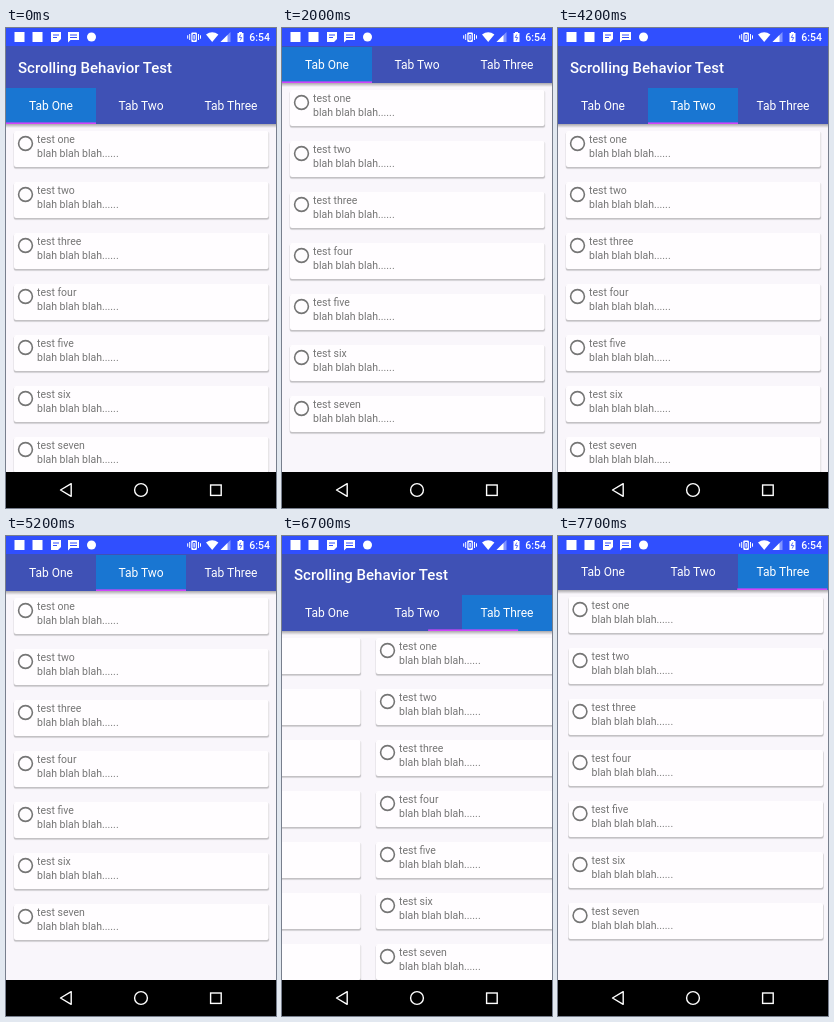
These frames come from a looping animation (270x480 px, 8000 ms). An HTML page:

```html
<!DOCTYPE html>
<html>
<head>
<meta charset="utf-8">
<style>
html, body { margin: 0; width: 100%; height: 100%; overflow: hidden; background: #000; }
svg { display: block; width: 100%; height: 100%; font-family: Roboto, sans-serif; }
#pages text { font-size: 10.5px; fill: #757575; }
#bar text { fill: #fff; font-size: 12px; text-anchor: middle; }
#bar .title { font-size: 15px; font-weight: 500; text-anchor: start; }
</style>
</head>
<body>
<svg viewBox="0 0 270 480">
  <defs>
    <linearGradient id="shade" x2="0" y2="1">
      <stop stop-color="#000" stop-opacity=".32"/>
      <stop offset="1" stop-color="#000" stop-opacity="0"/>
    </linearGradient>
  </defs>
  <rect width="270" height="444" fill="#f9f6fb"/>
  <g id="pages"></g>
  <g id="bar">
    <rect y="96" width="270" height="4" fill="url(#shade)"/>
    <rect y="18" width="270" height="78" fill="#3f51b5"/>
    <text class="title" x="12" y="44.7">Scrolling Behavior Test</text>
    <rect id="active" y="60" width="90" height="36" fill="#1976d2"/>
    <rect id="line" y="94.4" width="90" height="1.6" fill="#d045fa"/>
    <text x="45" y="82.3">Tab One</text>
    <text x="135" y="82.3">Tab Two</text>
    <text x="225" y="82.3">Tab Three</text>
  </g>

  <!-- status bar -->
  <rect width="270" height="18" fill="#304ffe"/>
  <g fill="#fff">
    <rect x="8.5" y="4" width="10" height="10"/>
    <rect x="26.5" y="4" width="10" height="10"/>
    <path d="M45 4h10v7l-3 3h-7z"/>
    <path d="M62 4h11v8h-8.500l-2.500 2.500z"/>
    <circle cx="85.500" cy="9" r="4.500"/>
    <rect x="185.300" y="4.500" width="5.600" height="9.500" rx="1"/>
    <path d="M200 6.500q6.200-4.500 12.400 0L206.200 14z"/>
    <path d="M214.500 14h10V4z" opacity=".4"/>
    <path d="M214.500 14h7V7z"/>
    <path d="M231.500 5h1.500V4h3v1h1.500v9h-6z"/>
    <text x="264" y="12.900" font-size="10.500" font-weight="500" text-anchor="end">6:54</text>
  </g>
  <path d="M47 7h6M47 9.500h4M64 7h7M64 9.500h7M187 6.500h2.200v5.500h-2.200z" stroke="#304ffe" fill="none"/>
  <path d="M183.700 6v6M181.700 7.300v3.400M192.500 6v6M194.500 7.300v3.400" stroke="#fff"/>
  <path d="M234.800 6.500l-1.500 3h2.400l-1.500 3" stroke="#304ffe" stroke-width=".8" fill="none"/>

  <!-- navigation bar -->
  <rect y="444" width="270" height="36" fill="#000"/>
  <g fill="none" stroke="#fff" stroke-width="1.400">
    <path d="M54.500 462l10.700-6.300v12.600z" stroke-linejoin="round"/>
    <circle cx="135" cy="462" r="6.400"/>
    <rect x="204.600" y="457" width="10.600" height="10.400"/>
  </g>
</svg>
<script>
const $ = id => document.getElementById(id);
const names = ["one", "two", "three", "four", "five", "six", "seven"];

const card = (x, y, name) => `<g transform="translate(${x} ${y})">
  <rect x="7.500" y=".4" width="256" height="37.800" rx="2.500" opacity=".06"/>
  <rect x="7.800" y="1" width="255.200" height="36.500" rx="2" opacity=".17"/>
  <rect x="8" width="254.600" height="36" rx="2" fill="#fffdff"/>
  <circle cx="19.500" cy="12.500" r="6.900" fill="none" stroke="#757575" stroke-width="1.600"/>
  <text x="31" y="12">test ${name}</text>
  <text x="31" y="26">blah blah blah......</text></g>`;

$("pages").innerHTML = [0, 270, 540].map(x =>
  names.map((name, i) => card(x, 103 + 51 * i, name)).join("")).join("");

const smooth = k => k * k * (3 - 2 * k);
const drag = k => k * k;
const settle = k => 1 - (1 - k) ** 4;

// each move: start ms, end ms, value reached, easing
const lift = [
  [1400, 2000, 41, smooth], [2400, 2900, 0, smooth],
  [4800, 5200, 41, smooth], [5600, 6000, 1, smooth],
  [7300, 7700, 42, smooth]
];
const swipe = [
  [3200, 3500, 117, drag], [3500, 4200, 270, settle],
  [6400, 6700, 454, drag], [6700, 7300, 537.5, settle]
];

function at(moves, t) {
  let v = 0;
  for (const [start, end, to, ease] of moves) {
    if (t <= start) break;
    v += (to - v) * ease(Math.min(1, (t - start) / (end - start)));
  }
  return v;
}

const move = (id, x, y) => $(id).setAttribute("transform", `translate(${x} ${y})`);
const begin = performance.now();

function draw(now) {
  const t = Math.floor(Math.max(0, now - begin) % 8000 / 100) * 100;
  const up = -at(lift, t);
  const tab = t < 3500 ? 0 : t < 6700 ? 1 : 2;
  move("pages", -at(swipe, t), up);
  move("bar", 0, up);
  move("active", 90 * tab, 0);
  move("line", at(swipe, t - 13) / 3, 0); // trails the page slightly
  requestAnimationFrame(draw);
}
draw(begin);
</script>
</body>
</html>
```
